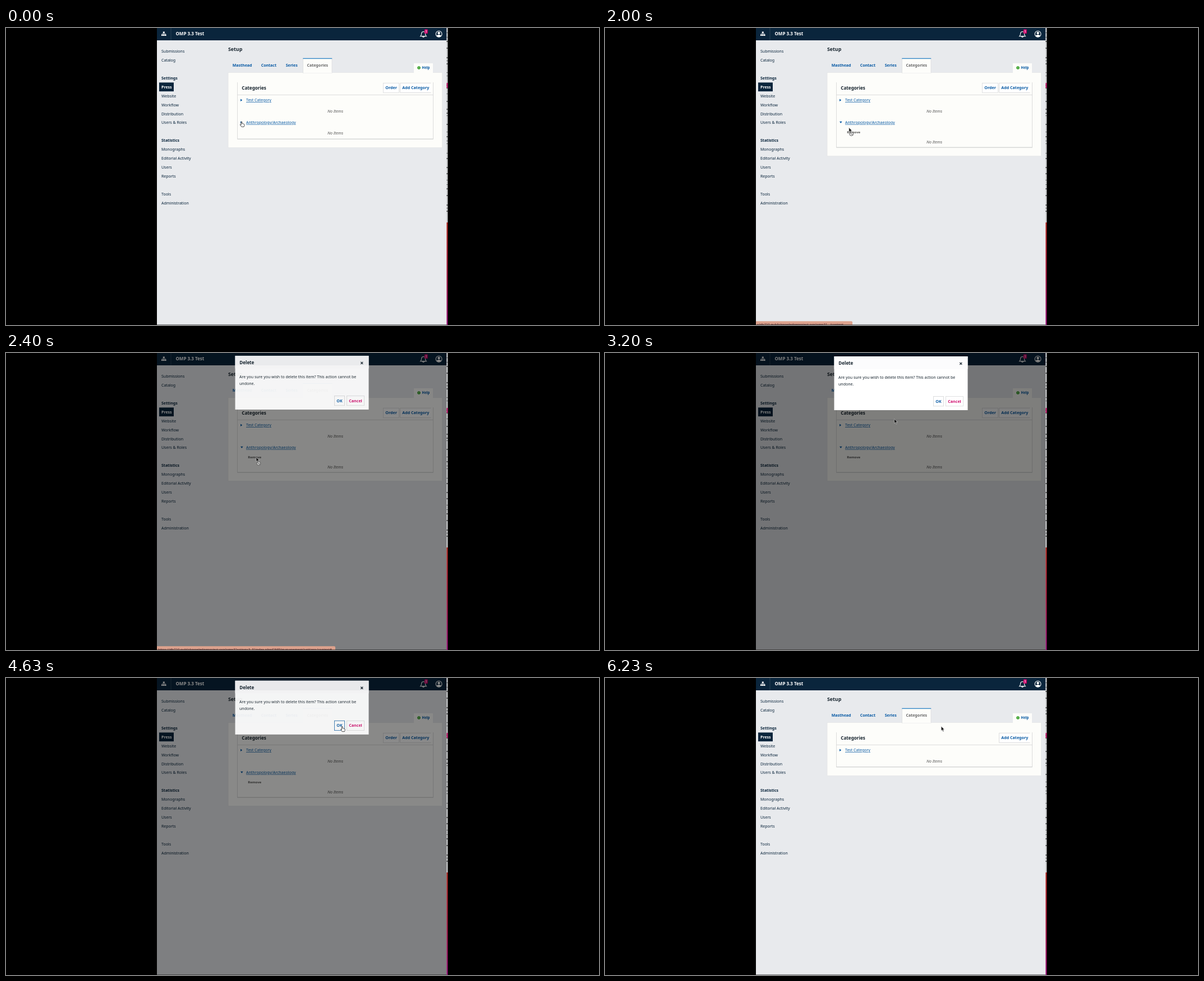
Animation, 1057 px wide and 530 px high, one loop 6.26 s. Source, as an HTML page:

```html
<!DOCTYPE html>
<html lang="en">
<head>
<meta charset="utf-8">
<title>Delete a category</title>
<style>
  html, body { margin: 0; width: 100%; height: 100%; overflow: hidden; background: #000; }
  svg { display: block; width: 1057px; height: 530px; }
  text { font-family: "Noto Sans", "Open Sans", sans-serif; white-space: pre; }
</style>
</head>
<body>
<svg id="stage" viewBox="0 0 1057 530"></svg>
<script>
const LOOP = 6260;
const NAVY = '#0a253c', BLUE = '#0659a4', INK = '#17242e', PINK = '#d00a6c';

const rect = (x, y, w, h, fill, more = '') =>
  `<rect x="${x}" y="${y}" width="${w}" height="${h}" fill="${fill}" ${more}/>`;
const text = (x, y, str, size = 7, fill = INK, more = '') =>
  `<text x="${x}" y="${y}" font-size="${size}" fill="${fill}" ${more}>${str}</text>`;
const bold = (x, y, str, size = 7, fill = BLUE) => text(x, y, str, size, fill, 'font-weight="700"');
const path = (d, more) => `<path d="${d}" ${more}/>`;
const group = (id, body) => `<g id="${id}">${body}</g>`;
const box = (x, y, w, h, line = '#d9dadb') => rect(x, y, w, h, '#fff', `stroke="${line}" stroke-width=".8"`);
const noItems = y => text(587, y, 'No Items', 7, '#555', 'font-style="italic" text-anchor="middle"');
const link = (y, str) => text(428, y, str, 7, BLUE, 'text-decoration="underline"');

function header() {
  return rect(269, 0, 516.5, 22, NAVY) + rect(293.6, 0, .8, 22, '#34495c') +
    bold(302.5, 13.2, 'OMP 3.3 Test', 8, '#fff') +
    path('M279.8 6.5h3v2.4h-3zM277 11.5h2.6v2.6h-2.6zM280 11.5h2.6v2.6h-2.6zM283 11.5h2.6v2.6h-2.6z', 'fill="#fff"') +
    path('M278.3 11.7v-1.5h6v1.5M281.3 8.5v3', 'fill="none" stroke="#fff" stroke-width=".7"') +
    path('M738.8 14.6c2-1.6 1.5-3.6 1.9-5.3.9-3.8 5.7-3.8 6.6 0 .4 1.7-.1 3.7 1.9 5.3zM742.4 15.2q1.6 2.6 3.2 0',
      'fill="none" stroke="#fff" stroke-width="1.1"') +
    rect(745.8, 2.3, 6, 7.6, PINK, 'rx="1.5"') +
    text(748.8, 8.3, '3', 5.5, '#fff', 'text-anchor="middle"') +
    '<circle cx="771.6" cy="10.7" r="5.4" fill="none" stroke="#fff" stroke-width="1.1"/>' +
    '<circle cx="771.6" cy="9" r="2.2" fill="#fff"/>' +
    path('M767.6 14c1.2-2.6 6.8-2.6 8 0-2 2.8-6 2.8-8 0z', 'fill="#fff"');
}

function sidebar() {
  const items = [[42, 'Submissions'], [58, 'Catalog'], [121.5, 'Website'], [137.3, 'Workflow'],
    [153.2, 'Distribution'], [169, 'Users &amp; Roles'], [216.7, 'Monographs'], [232.6, 'Editorial Activity'],
    [248.5, 'Users'], [264.4, 'Reports'], [296.2, 'Tools'], [312.1, 'Administration']];
  return items.map(([y, s]) => text(277, y + 2.4, s, 7, NAVY)).join('') +
    bold(277, 92, 'Settings', 7, NAVY) + bold(277, 203.4, 'Statistics', 7, NAVY) +
    rect(273, 97.3, 26, 15.8, NAVY) + bold(277, 107.8, 'Press', 7, '#fff');
}

function content() {
  return bold(396, 41.4, 'Setup', 8.8, INK) +
    bold(403.7, 69.2, 'Masthead') + bold(454.7, 69.2, 'Contact') + bold(498.7, 69.2, 'Series') +
    rect(396, 79.5, 381.5, 134, '#fdfdfa', 'id="panel" stroke="#dfe1e3" stroke-width=".6"') +
    rect(529.5, 54, 51.5, 26.2, '#fdfdfa', 'stroke="#d5d8db" stroke-width=".6"') +
    rect(529.3, 53.8, 51.9, 1.3, '#2f86c6') + rect(530, 79, 50.5, 1.4, '#fdfdfa') +
    bold(536.5, 69.2, 'Categories', 7, '#666') +
    rect(727, 63, 34, 17, '#fdfdfa') + '<circle cx="736" cy="71" r="2.7" fill="#2b9a1c"/>' +
    rect(735.6, 69.5, .8, 3, '#fff') + bold(741.5, 73.2, 'Help', 6.1) +
    path('', 'id="grid" fill="none" stroke="#d3d4d5" stroke-width=".8"') +
    rect(412.5, 0, 349, 1, '#c3c5c6', 'id="gridBase"') +
    bold(420.3, 109.8, 'Categories', 8.1, INK) +
    group('order', box(672.5, 98.3, 28, 17) + bold(676.3, 109.2, 'Order', 7.1)) +
    rect(702.5, 98.3, 55, 17, '#fff') +
    path('M757.5 98.3h-55v17h55', 'fill="none" stroke="#d3d4d5" stroke-width=".8"') +
    bold(706.3, 109.2, 'Add Category', 7.1) +
    path('M418 126.6l3.2 2.2-3.2 2.2z', `fill="${BLUE}"`) + link(131.3, 'Test Category') + noItems(151) +
    group('second', path('', `id="toggle" fill="${BLUE}"`) + link(170.8, 'Anthropology/Archaeology') +
      group('remove', bold(431.2, 187.7, 'Remove', 6, 'inherit')) +
      group('empty', noItems(190.3)));
}

function dialog() {
  return rect(408.5, 6, 238, 96, '#fff') + rect(408.5, 6, 238, 22.5, '#fcfcfd') +
    bold(416.3, 21, 'Delete', 8, INK) +
    path('M632.3 16.9l4 4m0-4l-4 4', 'stroke="#17242e" stroke-width="1.3"') +
    text(416, 46.4, 'Are you sure you wish to delete this item? This action cannot be') +
    text(416, 58.4, 'undone.') +
    rect(585.5, 77.5, 18, 17.3, '#fff', 'id="okBox" stroke-width=".9"') + bold(589.3, 88.6, 'OK', 7.1) +
    box(607.5, 77.5, 31, 17.3) + bold(611.3, 88.6, 'Cancel', 7.1, PINK);
}

// Sliver of another window showing at the right edge.
function edge() {
  let dashes = '', seed = 7;
  for (let y = 8; y < 342; y += 5 + seed % 13) {
    seed = (seed * 37 + 11) % 101;
    dashes += rect(785.6, y, 1.2, 1 + seed % 2, '#222');
  }
  return '<linearGradient id="glow" x2="0" y2="1"><stop stop-color="#d4332b"/>' +
    '<stop offset=".5" stop-color="#c31f4c"/><stop offset="1" stop-color="#b1148e"/></linearGradient>' +
    rect(785.5, 0, 1.8, 347, '#e4e6e8') + dashes + rect(785.5, 98, 1.8, 9, PINK) +
    rect(785.5, 347, 1.8, 183, 'url(#glow)');
}

function cursors() {
  const arrow = path('M0 0v7.8l1.8-1.6 1.4 3 1.3-.6-1.4-2.9h2.5z', 'fill="#111" stroke="#eee" stroke-width=".5"');
  return group('hand', path('M-.9.6q.9-1.2 1.7 0v3q1.2-.6 1.6.3 1.3-.4 1.5.6 1-.1 1 1v1.6l-.8 2.2H-.2L-2.8 5.5q0-1.2 1.9.4z',
      'fill="#fff" stroke="#222" stroke-width=".8"')) +
    group('arrow', arrow) +
    group('denied', arrow + '<circle cx="4.3" cy="11" r="3.5" fill="#ddd" fill-opacity=".6" stroke="#555" stroke-width=".9"/>' +
      path('M1.9 8.6l4.8 4.8', 'stroke="#555" stroke-width=".9"'));
}

const stage = document.getElementById('stage');
stage.innerHTML = rect(269, 0, 516.7, 530, '#e8eaed') + header() + sidebar() + content() +
  rect(269, 0, 516.7, 530, '#000', 'id="dim"') + group('dialog', dialog()) +
  group('status', rect(267, 523.3, 174, 12, '#dda28d', 'id="bar" rx="2"') + text(271, 530.6, '', 6, '#4a2630', 'id="url"')) +
  rect(0, 523, 269, 7, '#000') + rect(269, 529.4, 518, .6, '#222') + edge() + group('cursor', cursors());

const $ = id => document.getElementById(id);
const set = (id, attrs) => { for (const k in attrs) $(id).setAttribute(k, attrs[k]); };
const show = (id, on) => set(id, { visibility: on ? 'visible' : 'hidden' });

// Value of the last [time, value] entry reached.
const held = (keys, t) => keys.reduce((v, [at, next]) => t >= at ? next : v, keys[0][1]);

const FADE = [[0, 0], [2200, .37], [2360, .8], [2400, .93], [2430, .97], [2630, .99], [2660, 1],
  [4630, .92], [4700, .75], [4760, .55], [4930, .27], [5100, 0]];
const STATUS = [[0, 0], [600, .4], [700, .8], [800, 1], [2800, 0]];
const POINTER = [[0, 'hand'], [1930, 'denied'], [2860, 'arrow'], [3660, 'hand'], [4760, 'arrow']];
const TRAIL = [[0, 420, 167], [1780, 420, 167], [2130, 446, 186], [2780, 446, 186], [3400, 554, 80],
  [3460, 556.5, 80], [3590, 556.5, 80], [3660, 599.3, 86.3], [LOOP, 599.3, 86.3]];
const URL_SHORT = 's/db710.publicknowledgeproject.org/omp31.../content';
const URL_LONG = 'https://db710.publicknowledgeproject.org/omp3?action=3_31index.php/OMP/management/settings/context#';

function pointerAt(t) {
  const q = Math.floor((t + 1) / 60) * 60;
  const i = TRAIL.findIndex(k => k[0] > q);
  const [t0, x0, y0] = TRAIL[i - 1], [t1, x1, y1] = TRAIL[i];
  const p = (q - t0) / (t1 - t0);
  return [x0 + (x1 - x0) * p, y0 + (y1 - y0) * p];
}

function draw(t) {
  const open = t >= 1060, removed = t >= 4760;
  const bottom = removed ? 159 : open ? 213.3 : 198.3;
  set('panel', { height: bottom + 15.4 - 79.5 });
  set('grid', { d: `M412.5 97V${bottom}M761.5 97V${bottom}M412.5 119.4H761.5` });
  set('gridBase', { y: bottom - .7 });
  show('order', !removed);
  $('second').style.display = removed ? 'none' : '';
  set('toggle', { d: open ? 'M418 166.8h4.6l-2.3 3.2z' : 'M418 166.2l3.2 2.2-3.2 2.2z' });
  $('remove').style.display = open ? '' : 'none';
  $('remove').firstChild.setAttribute('fill', t >= 1600 ? '#555' : BLUE);
  set('empty', { transform: `translate(0 ${open ? 15.3 : 0})` });

  const fade = held(FADE, t);
  set('dim', { opacity: fade / 2 });
  set('dialog', { opacity: fade, transform: `translate(0 ${-15 * (1 - fade)})` });
  set('okBox', { stroke: t >= 4130 ? '#2f74b0' : '#d9dadb' });

  const long = t >= 2360;
  set('status', { opacity: held(STATUS, t) });
  set('bar', { width: long ? 320 : 174 });
  $('url').textContent = long ? URL_LONG : URL_SHORT;

  const kind = held(POINTER, t);
  for (const id of ['hand', 'arrow', 'denied']) show(id, id === kind);
  set('cursor', { transform: `translate(${pointerAt(t)})` });
}

function tick() {
  draw(performance.now() % LOOP);
  requestAnimationFrame(tick);
}
tick();
</script>
</body>
</html>
```
